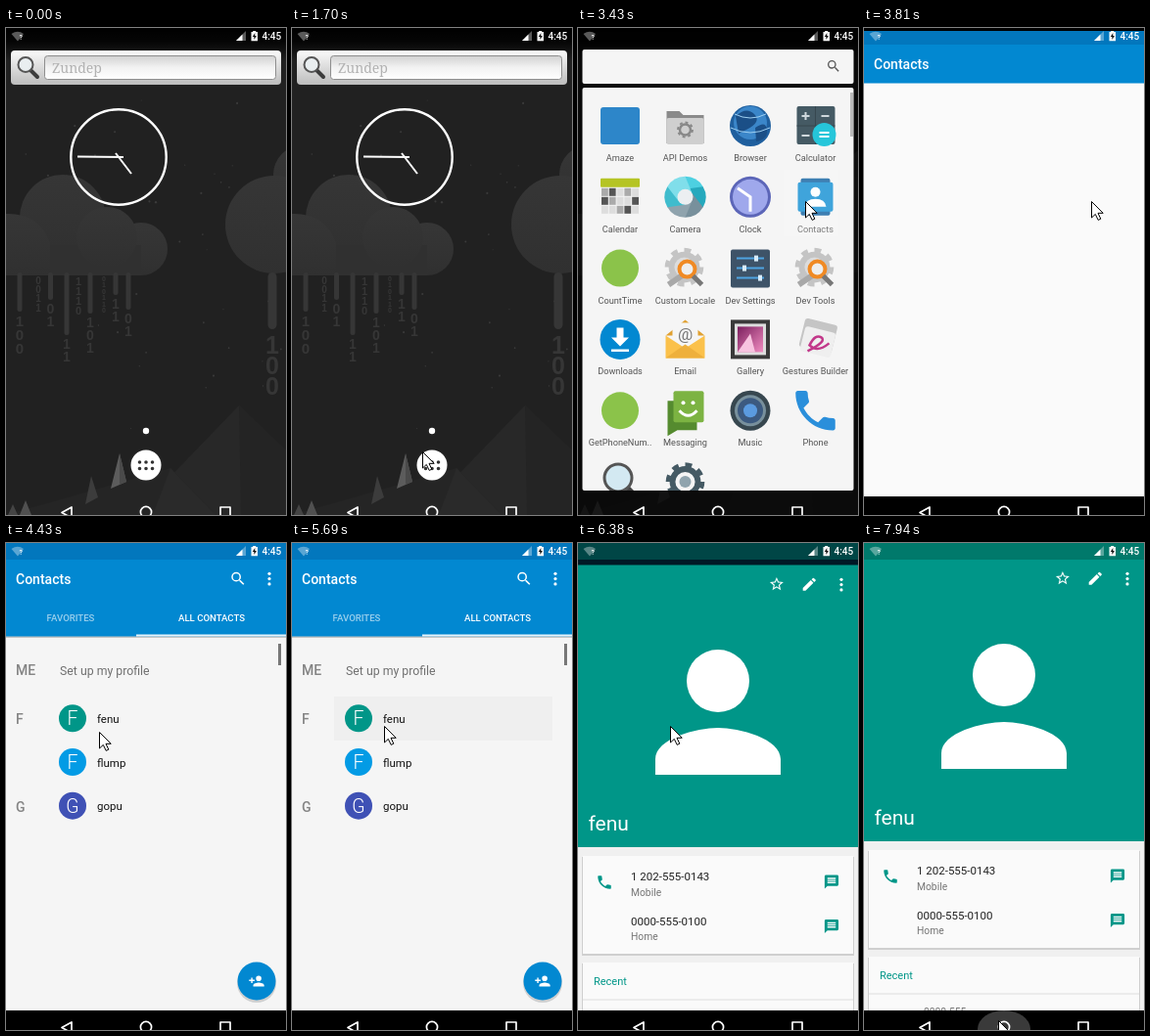
Write an HTML page that moves like this. It is 286 px wide and 498 px high and loops after 8 s.

```html
<!DOCTYPE html>
<html lang="en">
<head>
<meta charset="utf-8">
<title>Phone contacts</title>
<style>
html, body { margin: 0; width: 100%; height: 100%; overflow: hidden; background: #000; }
body { position: relative; font-family: Roboto, sans-serif; }
svg { position: absolute; left: 0; top: 0; width: 286px; height: 498px; overflow: hidden; }
text { white-space: pre; }
.mid { text-anchor: middle; }
.med { font-weight: 500; }
#widgets, #scrim, #drawer, #bar, #apps, #contacts, #content, #fab, #press, #dim, #sheet,
#topbar, #navbar, #ripple, #cursor { animation: 8s step-end infinite; }

#widgets { animation-name: widgets; }
@keyframes widgets { 24% { opacity: .85 } 25% { opacity: .5 } 26% { opacity: .2 } 27% { opacity: 0 } }
#scrim { opacity: 0; animation-name: scrim; }
@keyframes scrim { 24% { opacity: .15 } 25% { opacity: .35 } 26% { opacity: .5 } 27% { opacity: .6 } 28.1% { opacity: .7 } }
#drawer { opacity: 0; animation-name: drawer; }
@keyframes drawer {
  24% { opacity: .3; clip-path: circle(22px at 143px 447px) }
  25% { opacity: .5; clip-path: circle(80px at 143px 447px) }
  26% { opacity: .7; clip-path: circle(200px at 143px 447px) }
  27% { opacity: .85; clip-path: circle(340px at 143px 447px) }
  28.1% { opacity: .91; clip-path: circle(600px at 143px 447px) }
  29.1% { opacity: .96; clip-path: none }
  30.1% { opacity: 1; clip-path: none }
}
#bar { opacity: 0; animation-name: bar; }
@keyframes bar { 25% { opacity: .3 } 26% { opacity: .6 } 27% { opacity: .85 } 28.1% { opacity: 1 } }
#apps { opacity: 0; animation-name: apps; }
@keyframes apps { 27% { opacity: .2 } 28.1% { opacity: .47 } 29.1% { opacity: .7 } 30.1% { opacity: .9 } 31.1% { opacity: 1 } }

#contacts { opacity: 0; animation-name: launch; }
@keyframes launch {
  42.875% { opacity: .25; clip-path: inset(145px 20px 285px 210px) }
  43.86% { opacity: .7; clip-path: inset(95px 0 220px 120px) }
  44.85% { opacity: 1; clip-path: inset(45px 0 110px 45px) }
  45.84% { opacity: 1; clip-path: inset(18px 0 35px 0) }
  46.75% { opacity: 1; clip-path: inset(8px 0 0 0) }
  47.6% { opacity: 1; clip-path: inset(3px 0 0 0) }
  48.6% { opacity: 1; clip-path: none }
}
#content { opacity: 0; animation-name: content; }
@keyframes content { 53.625% { opacity: .5 } 54.5% { opacity: 1 } }
#fab { transform: translate(256px, 448px) scale(0); animation-name: fab; }
@keyframes fab {
  53.625% { transform: translate(256px, 448px) scale(.4) }
  54.5% { transform: translate(256px, 448px) scale(.85) }
  55.375% { transform: translate(256px, 448px) }
}
#press { opacity: 0; animation-name: press; }
@keyframes press { 71.125% { opacity: 1 } }

#dim { opacity: 0; animation-name: dim; }
@keyframes dim { 74% { opacity: .4 } 74.75% { opacity: .74 } 76.75% { opacity: .78 } 77.75% { opacity: .82 } }
#sheet { transform: translateY(498px); animation-name: sheet; }
@keyframes sheet {
  74% { transform: translateY(330px) } 74.75% { transform: translateY(179px) }
  76.75% { transform: translateY(120px) } 77.75% { transform: translateY(60px) }
  78.75% { transform: translateY(25px) } 79.75% { transform: translateY(6px) }
  80.75% { transform: none }
}
#topbar { opacity: 0; animation-name: topbar; }
@keyframes topbar { 79.75% { opacity: .5 } 80.75% { opacity: 1 } }
#navbar { opacity: 0; animation-name: navbar; }
@keyframes navbar { 44.85% { opacity: 1; transform: translateY(1.5px) } 53.625% { opacity: 1; transform: none } }
#ripple { opacity: 0; animation-name: ripple; }
@keyframes ripple { 99.25% { opacity: 1 } }

#cursor { transform: translate(300px, 500px); animation-name: cursor; }
@keyframes cursor {
  11.5% { transform: translate(164px, 488px) } 12.375% { transform: translate(150px, 476px) }
  13.25% { transform: translate(141px, 466px) } 16.25% { transform: translate(141px, 458px) }
  17.25% { transform: translate(141px, 450px) } 20.25% { transform: translate(137px, 441px) }
  21.25% { transform: translate(133px, 433px) } 28.1% { transform: translate(141px, 436px) }
  29.1% { transform: translate(152px, 420px) } 30.1% { transform: translate(168px, 385px) }
  31.1% { transform: translate(183px, 345px) } 32.1% { transform: translate(196px, 305px) }
  33% { transform: translate(204px, 270px) } 33.875% { transform: translate(210px, 244px) }
  34.875% { transform: translate(226px, 220px) } 35.875% { transform: translate(236px, 195px) }
  36.875% { transform: translate(232px, 177px) } 48.6% { transform: translate(222px, 178px) }
  49.6% { transform: translate(190px, 182px) } 50.6% { transform: translate(155px, 186px) }
  51.6% { transform: translate(125px, 190px) } 52.75% { transform: translate(104px, 192px) }
  53.625% { transform: translate(97px, 193px) } 55.375% { transform: translate(95px, 193px) }
  57.375% { transform: translate(95px, 191px) } 58.375% { transform: translate(95px, 189px) }
  59.375% { transform: translate(94px, 187px) } 85.5% { transform: translate(96px, 200px) }
  86.5% { transform: translate(102px, 235px) } 87.5% { transform: translate(110px, 280px) }
  88.5% { transform: translate(118px, 330px) } 89.5% { transform: translate(126px, 385px) }
  90.5% { transform: translate(132px, 435px) } 91.5% { transform: translate(136px, 472px) }
  92.5% { transform: translate(137px, 488px) }
}
</style>
</head>
<body>
<svg viewBox="0 0 286 498">
  <defs>
    <linearGradient id="fade" x2="0" y2="1"><stop stop-color="#000"/><stop offset=".4" stop-color="#000" stop-opacity=".85"/><stop offset="1" stop-color="#000" stop-opacity="0"/></linearGradient>
    <linearGradient id="metal" x2="0" y2="1"><stop stop-color="#fafafa"/><stop offset="1" stop-color="#bdbdbd"/></linearGradient>
    <linearGradient id="field" x2="0" y2="1"><stop stop-color="#d2d2d2"/><stop offset=".5" stop-color="#f2f2f2"/><stop offset="1" stop-color="#fff"/></linearGradient>
    <linearGradient id="cloud" x2="0" y2="1"><stop stop-color="#363636"/><stop offset="1" stop-color="#303030"/></linearGradient>
    <linearGradient id="photo" x2="1" y2="1"><stop stop-color="#7b1f5e"/><stop offset="1" stop-color="#f08cc0"/></linearGradient>
    <symbol id="find" viewBox="0 0 24 24"><path d="M15.5 14h-.79l-.28-.27A6.47 6.47 0 0 0 16 9.5 6.5 6.5 0 1 0 9.5 16c1.61 0 3.09-.59 4.23-1.57l.27.28v.79l5 4.99L20.49 19zm-6 0a4.5 4.5 0 1 1 0-9 4.5 4.5 0 0 1 0 9z"/></symbol>
    <symbol id="call" viewBox="0 0 24 24"><path d="M6.62 10.79c1.44 2.83 3.76 5.14 6.59 6.59l2.2-2.2c.27-.27.67-.36 1.02-.24 1.12.37 2.33.57 3.57.57.55 0 1 .45 1 1V20c0 .55-.45 1-1 1-9.39 0-17-7.61-17-17 0-.55.45-1 1-1h3.5c.55 0 1 .45 1 1 0 1.25.2 2.45.57 3.57.11.35.03.74-.25 1.02z"/></symbol>
    <symbol id="msg" viewBox="0 0 24 24"><path d="M20 2H4a2 2 0 0 0-2 2v18l4-4h14a2 2 0 0 0 2-2V4a2 2 0 0 0-2-2zm-2 12H6v-2h12zm0-3H6V9h12zm0-3H6V6h12z"/></symbol>
    <g id="more"><circle cx="269" cy="31.3" r="1.6"/><circle cx="269" cy="36.6" r="1.6"/><circle cx="269" cy="41.9" r="1.6"/></g>
  </defs>
  <rect width="286" height="498" fill="#212121"/>
  <g id="stars" fill="#3a3a3a"></g>
  <g fill="url(#cloud)">
    <circle cx="303" cy="150" r="30"/><circle cx="274" cy="201" r="50"/>
    <circle cx="58" cy="194" r="44"/><circle cx="138" cy="226" r="27"/><path d="M0 222H138V253H0z" fill="#303030"/>
    <circle cx="103" cy="214" r="31"/><path d="M0 190Q34 189 45 220V253H0z"/>
  </g>
  <g id="rain" fill="#363636"></g>
  <path d="M238 386L286 432V498H130z" fill="#282828"/>
  <path d="M238 386L286 432V498H240z" fill="#242424"/>
  <path d="M0 498L168 450 214 498z" fill="#252525"/>
  <path d="M168 450L214 498H150z" fill="#2a2a2a"/>
  <path d="M116 435L123 464 107 471z" fill="#5c5c5c"/><path d="M116 435L123 464 116 467z" fill="#4a4a4a"/>
  <path d="M87 458L94 480 81 487z" fill="#3c3c3c"/>
  <path d="M20 483L26 498H14z" fill="#505050"/><path d="M7 487L12 498H2z" fill="#444"/>
  <rect width="286" height="34" fill="url(#fade)"/>
  <rect id="scrim" width="286" height="498"/>
  <g id="widgets">
    <rect x="5" y="23" width="276" height="35" rx="4" fill="url(#metal)"/>
    <rect x="39.5" y="28.5" width="236" height="24" rx="3" fill="url(#field)" stroke="#8e8e8e"/>
    <path d="M25 43L32 50" stroke="#3c3c3c" stroke-width="4" stroke-linecap="round"/>
    <circle cx="20" cy="37.5" r="7.5" fill="#e9eef0" stroke="#555" stroke-width="2"/>
    <text x="47" y="46" font-size="14" font-family="Noto Serif, serif" fill="#b2b2b2">Zundep</text>
    <g fill="none" stroke="#fff" stroke-width="2"><circle cx="115" cy="132" r="48.7" stroke-width="2.4"/><path d="M120 132L73 131.5M112 128L128 149"/></g>
    <circle cx="143" cy="412" r="3.2" fill="#fff"/>
    <circle cx="143" cy="447" r="15.5" fill="#fff"/>
    <path d="M136.5 444h.01m6.5 0h.01m6.5 0h.01M136.5 450.5h.01m6.5 0h.01m6.5 0h.01" stroke="#333" stroke-width="3.6" stroke-linecap="round"/>
  </g>
</svg>

<svg id="bar" viewBox="0 0 286 498">
  <rect x="4.5" y="22" width="277" height="35" rx="2" fill="#f5f5f5"/>
  <use href="#find" x="253" y="31" width="16" height="16" fill="#555"/>
</svg>
<svg id="drawer" viewBox="0 0 286 498">
  <clipPath id="panel"><rect x="4.5" y="61" width="277" height="412" rx="2"/></clipPath>
  <g clip-path="url(#panel)">
    <rect width="286" height="498" fill="#f5f5f5"/>
    <g id="apps"></g>
    <rect x="278" y="66" width="3" height="45" fill="#bbb"/>
  </g>
</svg>

<svg id="contacts" viewBox="0 0 286 498">
  <rect width="286" height="498" fill="#fafafa"/>
  <rect width="286" height="56.5" fill="#0288d1"/><rect width="286" height="17" fill="#0277bd"/>
  <text class="med" x="10" y="42" font-size="14" fill="#fff">Contacts</text>
  <g id="content">
    <path d="M0 96H286V498H0z" fill="#f5f5f5"/>
    <path d="M0 95H286V97H0z" fill="#c4c4c4"/>
    <path d="M0 56H286V95.5H0z" fill="#0288d1"/><path d="M133 93.5H286V95.5H133z" fill="#e8f4fb"/>
    <use href="#find" x="228" y="27.5" width="18" height="18" fill="#fff"/><use href="#more" fill="#fff"/>
    <g class="mid med" font-size="9.6" fill="#fff"><text x="66" y="79.5" opacity=".6">FAVORITES</text><text x="210" y="79.5">ALL CONTACTS</text></g>
    <rect id="press" x="43" y="157" width="223" height="45" fill="#efefef"/>
    <g class="med" font-size="14" fill="#858585"><text x="10" y="134.5">ME</text><text x="10" y="185">F</text><text x="10" y="275">G</text></g>
    <text x="55" y="134.5" font-size="12.3" fill="#707070">Set up my profile</text>
    <g id="people"></g>
    <rect x="278" y="103" width="3" height="22" fill="#777"/>
  </g>
  <g id="fab">
    <circle cy="2" r="20" opacity=".15"/><circle r="19.5" fill="#0288d1"/>
    <path transform="scale(.7) translate(-12 -12)" fill="#fff" d="M15 12a4 4 0 1 0 0-8 4 4 0 0 0 0 8zm-9-2V7H4v3H1v2h3v3h2v-3h3v-2zm9 4c-2.67 0-8 1.34-8 4v2h16v-2c0-2.66-5.33-4-8-4z"/>
  </g>
</svg>

<svg viewBox="0 0 286 498">
  <rect id="dim" width="286" height="498"/>
  <g id="sheet">
    <path d="M0 17H286V498H0z" fill="#f0f0f0"/>
    <path d="M0 16.5H286V305H0z" fill="#009688"/>
    <g fill="#fff">
      <path transform="translate(47 71) scale(8)" d="M12 12a4 4 0 1 0 0-8 4 4 0 0 0 0 8zm0 2c-2.67 0-8 1.34-8 4v2h16v-2c0-2.66-5.33-4-8-4z"/>
      <path transform="translate(194.5 27.5) scale(.7)" d="M22 9.24l-7.19-.62L12 2 9.19 8.63 2 9.24l5.46 4.73L5.82 21 12 17.27 18.18 21l-1.63-7.03zM12 15.4l-3.76 2.27 1-4.28-3.32-2.88 4.38-.38L12 6.1l1.71 4.04 4.38.38-3.32 2.88 1 4.28z"/>
      <path transform="translate(227.5 27.5) scale(.73)" d="M3 17.25V21h3.75L17.81 9.94l-3.75-3.75zM20.71 7.04a1 1 0 0 0 0-1.41l-2.34-2.34a1 1 0 0 0-1.41 0l-1.83 1.83 3.75 3.75z"/>
      <use href="#more"/>
      <text x="10.5" y="287.5" font-size="21">fenu</text>
    </g>
    <path d="M4 315H282V416H4zM4 424H282V498H4z" fill="#cfcfcf"/>
    <path d="M5 314H281V414H5zM5 423H281V498H5z" fill="#fafafa"/>
    <path d="M5 461H281" stroke="#ddd"/>
    <g fill="#009688">
      <use href="#call" x="18" y="332" width="18" height="18"/>
      <use href="#msg" x="250.5" y="332" width="17" height="17"/><use href="#msg" x="250.5" y="377.5" width="17" height="17"/>
      <text x="16" y="446" font-size="11">Recent</text>
    </g>
    <g font-size="11.5" fill="#212121"><text x="54" y="339">1 202-555-0143</text><text x="54" y="385">0000-555-0100</text></g>
    <g font-size="10.3" fill="#757575"><text x="54" y="355">Mobile</text><text x="54" y="400">Home</text><text x="61" y="483">0000-555</text></g>
  </g>
  <rect id="topbar" width="286" height="17" fill="#00796b"/>
  <path id="navbar" d="M0 478H286V498H0z"/>
  <clipPath id="nav"><path d="M0 478H286V498H0z"/></clipPath>
  <g clip-path="url(#nav)"><ellipse id="ripple" cx="143" cy="497" rx="27" ry="19" fill="#3a3a3a"/></g>
  <g fill="none" stroke="#fff" stroke-width="1.7" stroke-linejoin="round"><path d="M57 495.5L67 490V501z"/><circle cx="143" cy="495" r="5.6"/><path d="M219 490h10v10h-10z"/></g>
  <g fill="#fff">
    <path d="M5.5 6Q12 1.5 18 6L12 13.5z" opacity=".35"/><text class="med" x="13.5" y="12" font-size="7">?</text>
    <path d="M235 13h10V3z" opacity=".35"/><path d="M235 13h6.5V6.5z"/>
    <path d="M250.5 4h1.7V3h3v1h1.8v9.3h-6.5z"/><path d="M254.3 5l-2.5 4h1.6v3l2.5-4h-1.6z" fill="#111"/>
    <text class="med" x="261.5" y="12.3" font-size="10">4:45</text>
  </g>
  <path id="cursor" d="M.5.5V17l3.8-3.6 2.9 6 2.6-1.2-2.8-5.9h5.2z" fill="#fff" stroke="#000"/>
</svg>

<script>
const fill = (id, html) => { document.getElementById(id).innerHTML = html; };
const dot = (x, y, r, c) => `<circle cx="${x}" cy="${y}" r="${r}" fill="${c}"/>`;
const box = (x, y, w, h, c, r = 0) => `<rect x="${x}" y="${y}" width="${w}" height="${h}" rx="${r}" fill="${c}"/>`;
const path = (d, c) => `<path d="${d}" fill="${c}"/>`;
const line = (d, c, w) => `<path d="${d}" fill="none" stroke="${c}" stroke-width="${w}"/>`;
const at = (x, y, s) => `<g transform="translate(${x} ${y})">${s}</g>`;
const gear = (r, c) => `<g fill="none" stroke="${c}"><circle r="${r}" stroke-width="${r * .45}"/>` +
  `<circle r="${r * 1.35}" pathLength="16" stroke-dasharray="1" stroke-width="${r * .35}"/></g>`;

// Wallpaper
const rnd = n => { const v = Math.sin(n * 127.1) * 43758.5; return v - Math.floor(v); };
fill('stars', Array.from({ length: 45 }, (_, i) =>
  `<circle cx="${rnd(i + 1) * 286}" cy="${60 + rnd(i + 90) * 370}" r="${.5 + rnd(i + 50) * .7}"/>`).join(''));

// x, end of streak, digit size, digits
const drops = [[14, 290, 15, '100'], [33, 0, 10, '0011'], [45.5, 278, 14, '01'], [62, 314, 14, '11'],
  [74, 0, 11, '1110'], [86, 292, 14, '101'], [100, 0, 7, '010110'], [112, 273, 14, '11'],
  [125, 288, 14, '01'], [272, 308, 25, '100']];
fill('rain', drops.map(([x, end, size, digits]) => {
  const w = size > 20 ? 9 : 5, top = end || 252;
  const bar = end ? `<rect x="${x - w / 2}" y="250" width="${w}" height="${end - 250}" rx="${w / 2}"/>` : '';
  return bar + [...digits].map((d, i) => `<text class="mid" x="${x}" y="${top + size * (.98 + i * (size > 20 ? .85 : .93))}"
    font-size="${size}" font-weight="700" font-family="Liberation Sans, sans-serif">${d}</text>`).join('');
}).join(''));

// App icons, each centred on 0,0
const green = dot(0, 0, 19, '#8bc34a');
const tools = at(-1, -1, dot(0, 0, 14, '#dcdcdc') + gear(13, '#c4c4c4')) + line('M-17 17L2 4', '#a8a8a8', 6) +
  `<circle cx="2" cy="1" r="8" fill="#eee" stroke="#f08a24" stroke-width="4"/>` + line('M8 8L17 17', '#777', 5);
const loupe = line('M4 4L17 17', '#444', 7) + `<circle cx="-2" cy="-4" r="14" fill="#d3e9f2" stroke="#555" stroke-width="3"/>`;
const blades = [0, 1, 2, 3, 4, 5].map(i => `<path transform="rotate(${i * 60})" d="M0 -21A21 21 0 0 1 18.2 -10.5L7 4 -7 -4z"
  fill="${['#4dd0e1', '#26a9bd', '#78909c', '#8fa3ad', '#3fbccd', '#80deea'][i]}"/>`).join('');
const days = Array.from({ length: 15 }, (_, i) =>
  box(-19 + i % 5 * 7.8, -9 + Math.floor(i / 5) * 9, 6.8, 8, i % 4 == 1 ? '#555' : i % 3 ? '#ddd' : '#aaa')).join('');
const apps = [
  ['Amaze', box(-20, -19, 40, 38, '#2d86c9', 3)],
  ['API Demos', path('M-19 -15H-6L-2 -11H19V18H-19z', '#8a8a8a') + box(-19, -8, 38, 27, '#cfcfcf', 2) + at(0, 4, gear(5.5, '#888'))],
  ['Browser', dot(0, 0, 21, '#1f5f9e') + dot(0, -3, 17, '#3b86c9') + path('M-15 -10Q-4 -20 4 -12T-4 4 -12 8zM5 2Q16 -6 17 4T6 16z', '#1b4f87') + line('M-20 2Q0 12 20 2M-16 -12Q0 -4 16 -12', '#9fd0f2', 1)],
  ['Calculator', box(-19, -20, 39, 39, '#455a64', 2) + line('M0 -20V19M-19 0H20', '#37474f', 1) + line('M-14 -10h8M-10 -14v8M6 -10h8M-14 10h8', '#cfd8dc', 2) + dot(9, 9, 12, '#26c6da') + line('M4 7h10M4 11h10', '#fff', 2)],
  ['Calendar', box(-20, -19, 40, 37, '#f4f4f4', 1) + box(-20, -19, 40, 9, '#b5c424', 1) + days],
  ['Camera', blades + dot(0, 0, 8, '#eceff1')],
  ['Clock', dot(0, 0, 21, '#5c66b8') + dot(0, 0, 18, '#9fa8ec') + line('M-13 -9L0 0V15', '#fff', 3)],
  ['Contacts', box(-15, -19, 30, 38, '#01579b', 2) + box(-18, -15, 36, 30, '#0288d1', 2) + dot(0, -5, 5, '#fff') + path('M-11 10Q-10 2 0 2T11 10z', '#fff')],
  ['CountTime', green],
  ['Custom Locale', tools],
  ['Dev Settings', box(-20, -19, 40, 39, '#3e5368', 2) + line('M-14 -10h28M-14 0h28M-14 10h28', '#4fa3e0', 2) + box(4, -13, 4, 6, '#d8ecfa') + box(-8, -3, 4, 6, '#d8ecfa') + box(8, 7, 4, 6, '#d8ecfa')],
  ['Dev Tools', tools],
  ['Downloads', dot(0, 0, 20.5, '#0288d1') + path('M-3.5 -12h7V-2H9L0 7 -9 -2h5.5zM-9 10H9V12.5H-9z', '#fff')],
  ['Email', path('M-20 -4L0 -20 20 -4z', '#e0a030') + box(-13, -17, 26, 24, '#f5f5f5') + '<text class="mid" y="1" font-size="17" fill="#777">@</text>' + path('M-20 -4L0 9 20 -4V19H-20z', '#fbc14b') + path('M-20 19L0 5 20 19z', '#eeb03c')],
  ['Gallery', box(-20, -20, 40, 40, '#3a3a3a') + box(-16, -16, 32, 32, '#ddd') + box(-13, -13, 26, 26, 'url(#photo)') + path('M-13 13L0 -6 5 13z', '#f7c3df')],
  ['Gestures Builder', `<g transform="rotate(14)">${box(-15, -19, 34, 30, '#c5c5c5', 3) + box(-13, -11, 32, 26, '#efefef', 3)}</g>` + line('M-8 12Q12 2 6 -2T-6 6Q2 14 14 4', '#c2388a', 2.5)],
  ['GetPhoneNum..', green],
  ['Messaging', path('M-18 -10H12V20H-8L-18 26z', '#558b2f') + box(-12, -20, 31, 32, '#7cb342', 2) + line('M-6 0Q3 10 12 0', '#fff', 3) + dot(-2, -8, 2, '#fff') + dot(8, -8, 2, '#fff')],
  ['Music', dot(0, 0, 20.5, '#37474f') + dot(0, 0, 16, '#78909c') + dot(0, 0, 13, '#3c5a80') + dot(0, 0, 7, '#5b9be0')],
  ['Phone', '<use href="#call" x="-27" y="-27" width="54" height="54" fill="#2a8fdb"/>'],
  ['', loupe],
  ['', gear(13, '#455a64') + dot(0, 0, 6, '#90a4ae')]
];
fill('apps', apps.map(([name, icon], i) => at(43 + i % 4 * 66.5, 100 + Math.floor(i / 4) * 72.8,
  icon + `<text class="mid" y="36" font-size="9.2" fill="#555">${name}</text>`)).join(''));

const people = [['fenu', '#009688'], ['flump', '#039be5'], ['gopu', '#3f51b5']];
fill('people', people.map(([name, color], i) => at(68, 179.3 + i * 44.7, dot(0, 0, 14, color) +
  `<text class="mid" y="7" font-size="19.5" font-weight="300" fill="#fff">${name[0].toUpperCase()}</text>
  <text x="25" y="4.5" font-size="11.5" fill="#111">${name}</text>`)).join(''));
</script>
</body>
</html>
```
